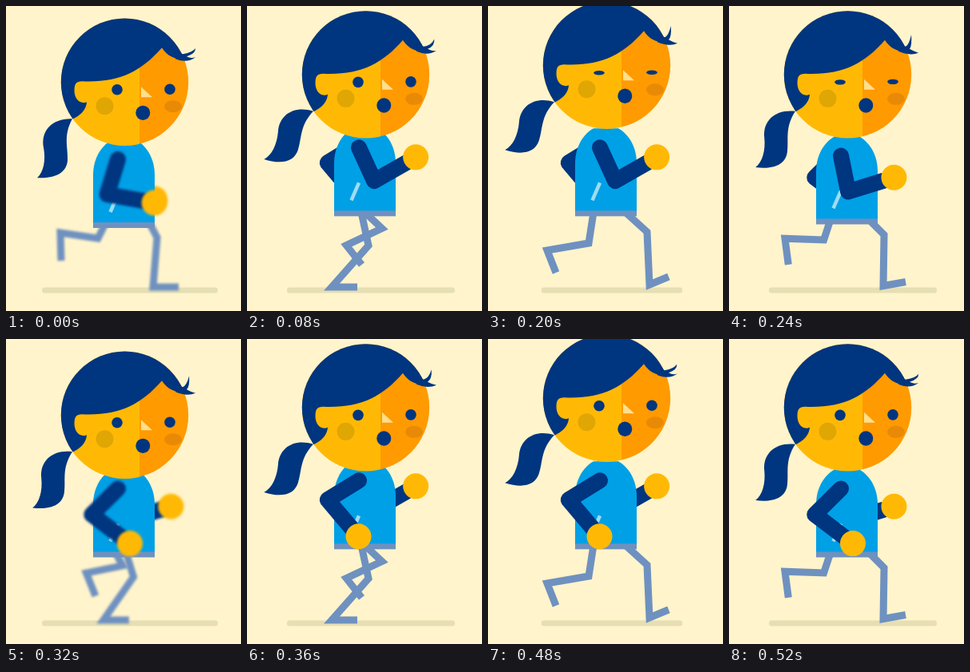
Recreate the animation shown at these times as an HTML page with a canvas. Size 294 by 382 pixels, loop 0.56 s.

```html
<!DOCTYPE html>
<html lang="en">
<head>
<meta charset="utf-8">
<title>Runner</title>
<style>
html, body { margin: 0; width: 100%; height: 100%; overflow: hidden; background: #fff4cb; }
canvas { display: block; }
</style>
</head>
<body>
<canvas id="stage" width="294" height="382"></canvas>
<script>
const ctx = document.getElementById('stage').getContext('2d');
const STEPS = 14, STRIDE = STEPS / 2, STEP_MS = 40, TAU = Math.PI * 2;
const NAVY = '#003580', YELLOW = '#ffb905', ORANGE = '#ff9a00', BLUE = '#00a0e6', DENIM = '#6f91c0';

// Key moments of one leg; "ease" is the ease-out power on the way to the next.
// Joints: hip x, then knee, ankle and toe.
const legKeys = [
  { at: 0, ease: 2.3, joints: [180, 189, 290, 184, 352, 216, 352] },  // contact
  { at: 2, ease: 2.3, joints: [143, 152, 300, 106, 352, 138, 352] },  // drive
  { at: 5, ease: 1.6, joints: [132, 126, 297, 74, 306, 85, 334] },    // push off
  { at: 7, ease: 1.6, joints: [124, 115, 291, 68, 284, 69, 319] },    // trail
  { at: 10, ease: 1, joints: [152, 180, 276, 136, 303, 159, 325] },   // pass
  { at: 12, ease: 1, joints: [172, 199, 283, 202, 349, 226, 339] }    // reach
];

function legPose(step) {
  const s = step % STEPS;
  const i = legKeys.findLastIndex(key => key.at <= s);
  const from = legKeys[i], to = legKeys[(i + 1) % legKeys.length];
  const t = (s - from.at) / ((to.at || STEPS) - from.at);
  const eased = 1 - (1 - t) ** from.ease;
  return from.joints.map((v, k) => v + (to.joints[k] - v) * eased);
}

function line(points, color, width, round) {
  ctx.beginPath();
  for (let i = 0; i < points.length; i += 2) ctx.lineTo(points[i], points[i + 1]);
  ctx.strokeStyle = color;
  ctx.lineWidth = width;
  ctx.lineCap = round ? 'round' : 'butt';
  ctx.lineJoin = round ? 'round' : 'miter';
  ctx.stroke();
}

function oval(x, y, rx, ry, color) {
  ctx.beginPath();
  ctx.ellipse(x, y, rx, ry, 0, 0, TAU);
  ctx.fillStyle = color;
  ctx.fill();
}

function shape(d, color) {
  ctx.fillStyle = color;
  ctx.fill(new Path2D(d));
}

// Limbs are softened by motion blur
function blurred(amount, draw) {
  ctx.filter = amount > 0.1 ? `blur(${amount}px)` : 'none';
  draw();
  ctx.filter = 'none';
}

function leg(step, waist) {
  const [hipX, ...rest] = legPose(step);
  line([hipX, waist - 5, ...rest], DENIM, 9);
}

// Two rigid bones; angles are measured forward from straight down
function arm(step, shoulderY) {
  const a = TAU * step / STEPS;
  const swing = Math.sin(a) + 0.15 * Math.sin(3 * a);
  const upper = (-17 + 49 * swing) * TAU / 360, fore = (80 + 47 * swing) * TAU / 360;
  const elbowX = 140 + 46 * Math.sin(upper), elbowY = shoulderY + 46 * Math.cos(upper);
  const along = d => [elbowX + d * Math.sin(fore), elbowY + d * Math.cos(fore)];
  line([140, shoulderY, elbowX, elbowY, ...along(46)], NAVY, 20, true);
  oval(...along(60), 16, 16, YELLOW);
}

function torso(b) {
  shape(`M109 ${b - 6}V${b - 66}C109 ${b - 86} 118 ${b - 102} 132 ${b - 110}H163
    C177 ${b - 102} 186 ${b - 86} 186 ${b - 66}V${b - 6}Z`, BLUE);
  ctx.fillStyle = DENIM;
  ctx.fillRect(109, b - 7, 77, 7);
  line([130.5, b - 20, 140, b - 42], '#9edcf3', 4.5);
}

function ponytail(turn) {
  ctx.save();
  ctx.translate(83, 142);
  ctx.rotate(turn * TAU / 360);
  shape('M0 0C-24 -1 -40 14 -36 36C-33 52 -36 67 -44 74C-22 75 -7 68 -6 52C-5 36 -12 22 0 0Z', NAVY);
  ctx.restore();
}

function head(step) {
  ctx.save();
  ctx.beginPath();
  ctx.arc(148.5, 96, 79.7, 0, TAU);
  ctx.clip();
  ctx.fillStyle = YELLOW;
  ctx.fillRect(60, 0, 107, 190);
  ctx.fillStyle = ORANGE;
  ctx.fillRect(167, 0, 70, 190);
  shape(`M195 53C202 64 212 69 232 68L240 0H60V150L82 143Q100 135 101 121L98 122
    C88 122 84 112 86 101Q87 95 95 95C140 97 168 84 195 53Z`, NAVY);
  ctx.restore();

  // Loose strands
  const sway = Math.cos(TAU * (step + 0.6) / STEPS);
  const tipX = 232.5 + 4.5 * sway, tipY = 50 + 4 * sway, lowY = 67 - 2 * sway;
  shape(`M212 56L221 61Q${tipX - 3} 59 ${tipX} ${tipY}Q${tipX + 1} 60 226 64
    Q231 67 237 ${lowY}Q226 73 212 67Z`, NAVY);

  const lid = Math.min(6.8, 2 + 2 * Math.abs(step - 5.4));
  oval(139, 105.5, 6.8, lid, NAVY);
  oval(205, 105, 6.8, lid, NAVY);
  oval(123.5, 126, 11, 11, '#dfa604');
  oval(209, 126.5, 11, 7.5, '#e88a06');
  shape('M169 102L183 115H169Z', '#ffdf8c');
  oval(171.3, 134.6, 9, 9.2, NAVY);
}

function draw(step) {
  const bounce = Math.cos(TAU * step / STRIDE);
  const lateBounce = Math.cos(TAU * (step - 0.5) / STRIDE);
  const waist = 266 + 12 * bounce;
  const shadow = 110 - 33 * ((1 - lateBounce) / 2) ** 2;

  ctx.fillStyle = '#fff4cb';
  ctx.fillRect(0, 0, 294, 382);
  ctx.beginPath();
  ctx.roundRect(155 - shadow, 352.5, shadow * 2, 7, 3);
  ctx.fillStyle = '#e6dfb4';
  ctx.fill();

  const blur = 1.6 * Math.max(0, lateBounce);
  blurred(blur, () => {
    arm(step + STRIDE, waist - 91);
    leg(step + STRIDE, waist);
    leg(step, waist);
  });
  torso(waist);

  ctx.save();
  ctx.translate(0, -13.2 + 13.8 * lateBounce);
  ponytail(12.3 * (1 - bounce));
  head(step);
  ctx.restore();

  blurred(blur, () => arm(step, waist - 86));
}

function tick() {
  draw(Math.floor(performance.now() / STEP_MS) % STEPS);
  requestAnimationFrame(tick);
}
tick();
</script>
</body>
</html>
```
